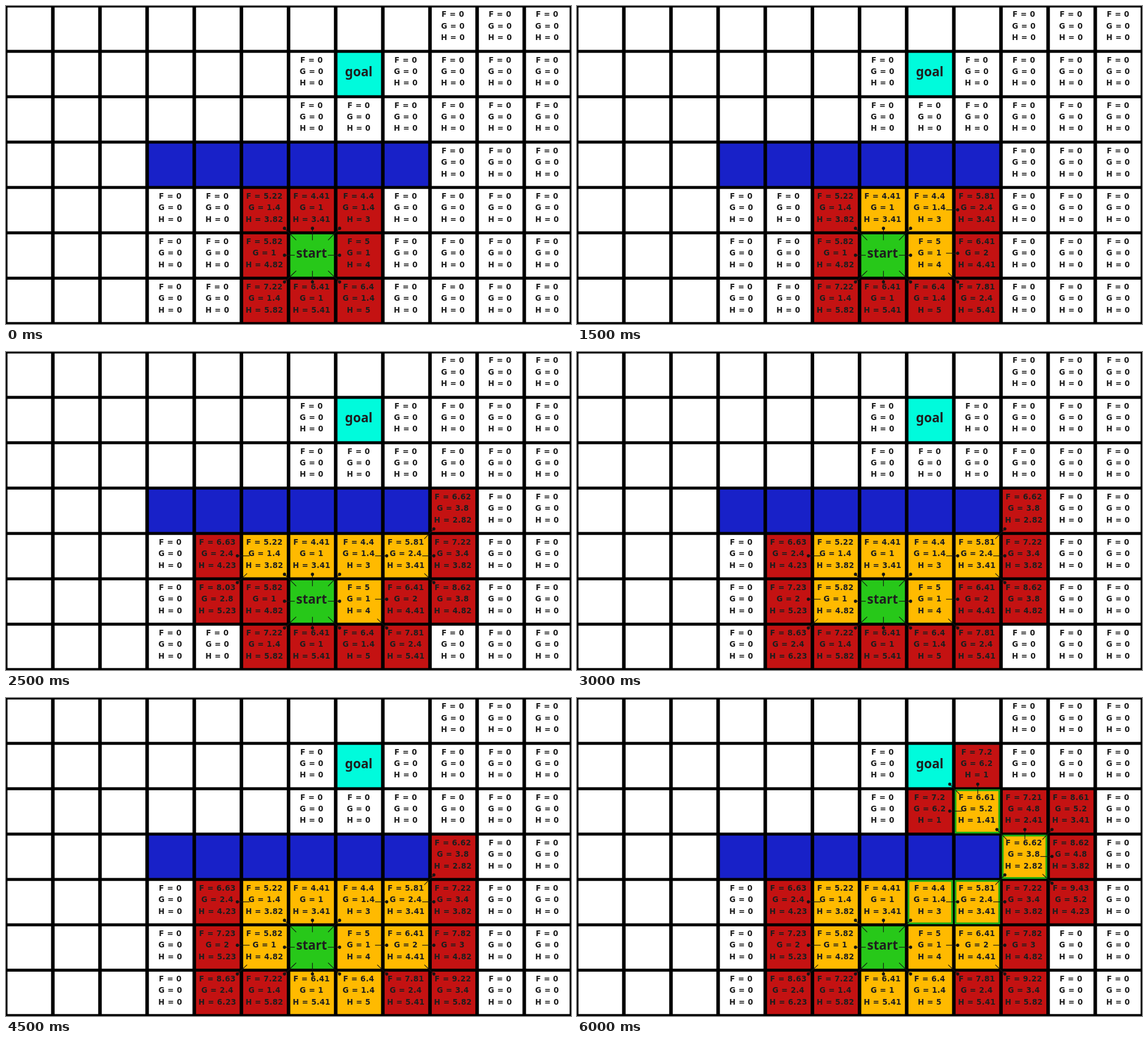
Animation of 998 by 561 pixels, one loop 6.5 s. Source, as an HTML page:

```html
<!DOCTYPE html>
<html lang="en">
<head>
<meta charset="utf-8">
<title>A* search</title>
<style>
html, body { margin: 0; width: 100%; height: 100%; overflow: hidden; background: #000; }
svg { display: block; }
text { text-anchor: middle; fill: #1e1e1e; }
.value { font: bold 13.2px "DejaVu Sans", sans-serif; letter-spacing: 0.35px; }
.label { font: bold 22.5px "Noto Sans", sans-serif; }
.link { stroke: #141414; stroke-width: 1.2; }
.dot { fill: #141414; }
.path { fill: none; stroke: #1fae14; stroke-width: 3; }
</style>
</head>
<body>
<svg id="stage" width="998" height="561" viewBox="0 0 998 561"></svg>
<script>
const STEP = 500;
const MAP = [
  '         000',
  '      0G0000',
  '      000000',
  '   WWWWWW000',
  '   000000000',
  '   000S00000',
  '   000000000'
];
const FILL = { W: '#1821c8', S: '#27c819', G: '#00fbdc', open: '#c41212', closed: '#ffba00' };
const LABEL = { S: 'start', G: 'goal' };
const DIRS = [[-1, 0], [1, 0], [0, -1], [0, 1], [-1, -1], [1, -1], [-1, 1], [1, 1]];
const START = { c: 6, r: 5, g: 0, h: 0 };
const GOAL = { c: 7, r: 1 };

const id = (c, r) => c + ',' + r;
const round = x => +x.toFixed(2);
const left = c => 2 + 83.27 * c;
const top_ = r => 2 + 80.03 * r;

function distance(c, r) {
  const dx = Math.abs(c - GOAL.c), dy = Math.abs(r - GOAL.r);
  return round(1.41 * Math.min(dx, dy) + Math.abs(dx - dy));
}

// Relax the neighbours of a node; stop as soon as the goal is reached.
function expand(nodes, node) {
  node.closed = true;
  for (const [dx, dy] of DIRS) {
    const c = node.c + dx, r = node.r + dy, kind = (MAP[r] || '')[c];
    if (kind !== '0' && kind !== 'G') continue;
    const g = round(node.g + (dx && dy ? 1.4 : 1)), old = nodes.get(id(c, r));
    if (old && (old.closed || old.g <= g)) continue;
    const h = distance(c, r);
    nodes.set(id(c, r), { c, r, g, h, f: round(g + h), parent: node, dx, dy });
    if (kind === 'G') return true;
  }
  return false;
}

function search() {
  const nodes = new Map([[id(START.c, START.r), { ...START }]]);
  const scenes = [];
  let node = nodes.get(id(START.c, START.r));
  while (node) {
    const done = expand(nodes, node);
    scenes.push(draw(nodes));
    if (done) break;
    node = null;
    for (const n of nodes.values())
      if (!n.closed && (!node || n.f < node.f)) node = n;
  }
  const path = [];
  for (let n = nodes.get(id(GOAL.c, GOAL.r)).parent; n.parent; n = n.parent) path.push(n);
  scenes.push(draw(nodes, path));
  return scenes;
}

function rect(c, r, attrs) {
  return `<rect x="${left(c) + 0.6}" y="${top_(r) + 0.6}" width="77" height="74.8" ${attrs}/>`;
}

function values(c, r, node) {
  const { f, g, h } = node || { f: 0, g: 0, h: 0 };
  const x = 290.2 + 83.2 * (c - 3);
  return [`F = ${f}`, `G = ${g}`, `H = ${h}`].map((s, i) =>
    `<text class="value" x="${x}" y="${19.4 + 80.1 * r + 20.4 * i}">${s}</text>`).join('');
}

function link({ parent: p, dx, dy }) {
  const x = left(p.c), y = top_(p.r), first = !p.parent;
  const inset = first ? 11 : 7.5;
  const endX = x + [-9.7, 39.7, 87.6][dx + 1];
  const endY = y + [-10, p.r === START.r && !first ? 34 : 37.5, 84.7][dy + 1];
  let x1 = endX, y1 = endY;
  if (dx) x1 = x + (dx < 0 ? inset : 78.3 - inset);
  if (dy) y1 = y + (dy < 0 ? inset : 76 - inset);
  if (!dy) x1 = x + (dx > 0 ? 67 : first ? 8.5 : 12);
  return `<line class="link" x1="${x1}" y1="${y1}" x2="${endX}" y2="${endY}"/>` +
    `<circle class="dot" cx="${endX}" cy="${endY}" r="2.8"/>`;
}

function draw(nodes, path = []) {
  let cells = '', text = '', links = '';
  MAP.forEach((row, r) => [...row].forEach((kind, c) => {
    const node = nodes.get(id(c, r));
    const state = node && (node.closed ? 'closed' : 'open');
    cells += rect(c, r, `fill="${FILL[kind] || FILL[state] || '#fff'}"`);
    if (kind === '0') text += values(c, r, node);
    if (LABEL[kind])
      text += `<text class="label" x="${left(c) + 38.2}" y="${top_(r) + 42}">${LABEL[kind]}</text>`;
    if (node && node.parent) links += link(node);
  }));
  const outline = path.map(({ c, r }) => rect(c, r, 'class="path"')).join('');
  return cells + outline + links + text;
}

const stage = document.getElementById('stage');
const scenes = search();
const t0 = performance.now();
let shown = -1;

function tick() {
  const i = Math.floor((performance.now() - t0) / STEP) % scenes.length;
  if (i !== shown) stage.innerHTML = scenes[shown = i];
  requestAnimationFrame(tick);
}
tick();
</script>
</body>
</html>
```
